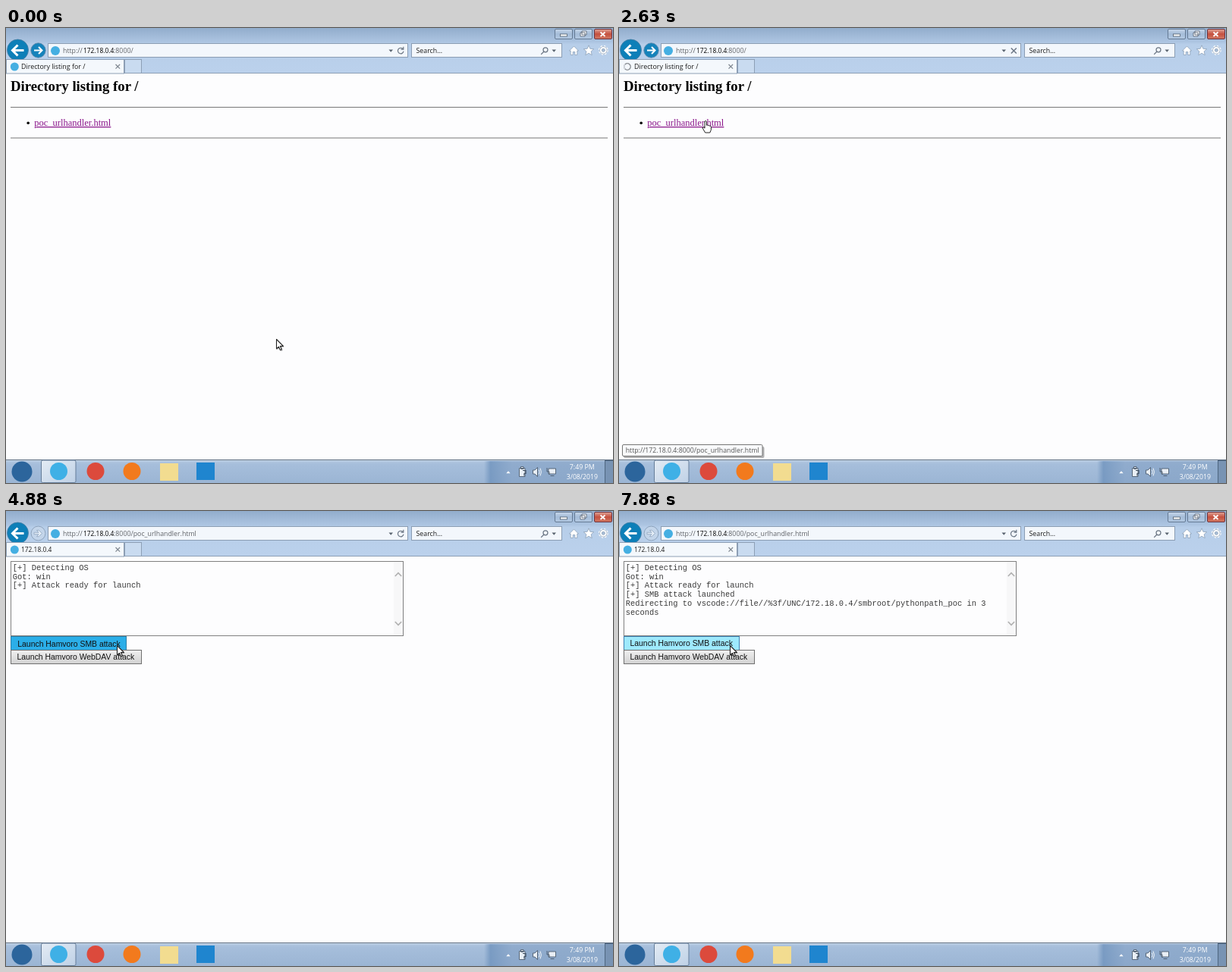
An HTML page that plays this animation: 800x600 px, repeating every 8 s.

```html
<!DOCTYPE html>
<html lang="en">
<head>
<meta charset="utf-8">
<title>Directory listing</title>
<style>
html, body { margin: 0; width: 100%; height: 100%; overflow: hidden; }
svg { display: block; width: 800px; height: 600px; }
text { white-space: pre; }
.ui { font: 8.8px "Open Sans", "Noto Sans", sans-serif; fill: #1c1c1c; }
.soft { fill: #606368; }
.serif { font: 12.5px "Liberation Serif", serif; }
.head { font-size: 18.75px; font-weight: bold; }
.link { fill: #8a168a; text-decoration: underline; }
.mono { font: 10.417px "Liberation Mono", monospace; fill: #3a3a3a; }
.btn { font: 10.417px "Liberation Sans", sans-serif; fill: #111; }
.line { fill: none; stroke: #6b7684; stroke-width: 1.2; }
.white { fill: none; stroke: #fff; }
</style>
</head>
<body>
<svg viewBox="0 0 800 600">
  <defs>
    <linearGradient id="frame" x2="0" y2="1">
      <stop stop-color="#92adcc"/><stop offset=".3" stop-color="#acc4e1"/><stop offset=".36" stop-color="#b7cee9"/><stop offset="1" stop-color="#bbd1ec"/>
    </linearGradient>
    <linearGradient id="bar" x2="0" y2="1">
      <stop stop-color="#b7cbe2"/><stop offset=".2" stop-color="#a6bedb"/><stop offset="1" stop-color="#9bb5d4"/>
    </linearGradient>
    <linearGradient id="tray">
      <stop stop-color="#6f93bd" stop-opacity="0"/><stop offset=".05" stop-color="#6f93bd" stop-opacity=".8"/><stop offset=".22" stop-color="#819fc4" stop-opacity=".6"/><stop offset="1" stop-color="#819fc2" stop-opacity=".6"/>
    </linearGradient>
    <linearGradient id="active" x2="1" y2="1">
      <stop stop-color="#e3ebf4"/><stop offset="1" stop-color="#bfd1e6"/>
    </linearGradient>
    <linearGradient id="ctrl" x2="0" y2="1">
      <stop stop-color="#c6d6e9"/><stop offset=".5" stop-color="#a4bcd8"/><stop offset="1" stop-color="#b4cae3"/>
    </linearGradient>
    <linearGradient id="close" x2="0" y2="1">
      <stop stop-color="#e0a598"/><stop offset=".5" stop-color="#c5503e"/><stop offset="1" stop-color="#d27a64"/>
    </linearGradient>
    <linearGradient id="face" x2="0" y2="1">
      <stop stop-color="#f0f0f0"/><stop offset="1" stop-color="#d2d2d2"/>
    </linearGradient>
  </defs>

  <rect width="800" height="600" fill="#fdfdfe"/>

  <!-- browser frame -->
  <rect width="800" height="60" fill="url(#frame)"/>
  <g fill="url(#ctrl)" stroke="#657a94">
    <rect x="723.5" y="1.5" width="23" height="13" rx="1.5"/>
    <rect x="749.5" y="1.5" width="23" height="13" rx="1.5"/>
    <rect x="775.5" y="1.5" width="23" height="13" rx="1.5" fill="url(#close)" stroke="#6e3440"/>
  </g>
  <g fill="#fff" stroke="#4f5c6c" stroke-width=".8">
    <rect x="730.5" y="8" width="9" height="3"/>
    <path d="M759 4h6v5h-6zM757 6h6v5h-6z"/>
  </g>
  <path d="M783.5 5.5l6 5.5m0-5.5l-6 5.5" class="white" stroke-width="1.7"/>

  <circle cx="15.5" cy="29" r="14" fill="#0d7fb8" stroke="#4a7ea3" stroke-width=".8"/>
  <path d="M23.5 29.5H9M15.5 22.5l-7 7 7 7" class="white" stroke-width="3"/>
  <g id="forwardOn">
    <circle cx="42.5" cy="29.5" r="9.7" fill="#1583bb" stroke="#5f86a8" stroke-width=".8"/>
    <path d="M37 29.5h10M43 25l4.5 4.5-4.5 4.5" class="white" stroke-width="2"/>
  </g>
  <g id="forwardOff" fill="none" stroke="#8ea4bd">
    <circle cx="42.5" cy="29.5" r="9.4" fill="#c3d5ea"/>
    <path d="M37 28.3h6l-2.5-3h2.7l4.3 4.2-4.3 4.2h-2.7l2.5-3h-6z" fill="#e4edf7" stroke-width=".8"/>
  </g>

  <g fill="#f3f7fc" stroke="#8b9db3">
    <rect x="55.5" y="20.5" width="474" height="18"/>
    <rect x="534.5" y="20.5" width="198" height="18"/>
  </g>
  <circle cx="65" cy="30" r="6" fill="#45afe2"/>
  <text x="75" y="33.3" class="ui soft">http://</text>
  <text x="102" y="33.3" class="ui" style="font-size:8.4px;fill:#000">172.18.0.4</text>
  <text x="142" y="33.3" class="ui soft" id="path"></text>
  <path d="M504.5 28.5h5.5l-2.75 3.3zM719.5 28.5h5.5l-2.75 3.3z" fill="#59636f"/>
  <g class="line">
    <path id="reload" d="M523 27.4a3.8 3.8 0 1 0 1 3.3M523.8 24.8v3.4h-3.4"/>
    <path id="stop" d="M516.8 26.5l7 7m0-7l-7 7" stroke-width="1.5"/>
    <circle cx="711" cy="28.8" r="3"/><path d="M709 31l-3.8 3.7"/>
  </g>
  <text x="540.5" y="33.3" class="ui">Search...</text>
  <g fill="#fff" stroke="#8398b1" stroke-width=".7">
    <path d="M742.5 30l6-6 6 6h-1.7v5.5h-3v-4h-2.6v4h-3V30z"/>
    <path d="M768 22.8l1.9 4.5 4.8.4-3.6 3.2 1.1 4.8-4.2-2.5-4.2 2.5 1.1-4.8-3.6-3.2 4.8-.4z"/>
    <circle cx="787.3" cy="29.3" r="5.3" stroke="#fff" stroke-width="2.2" stroke-dasharray="2.2 1.96"/>
    <circle cx="787.3" cy="29.3" r="4.8"/>
    <circle cx="787.3" cy="29.3" r="2" fill="#a9bfd9"/>
  </g>

  <path d="M0 59.5h800" stroke="#8d9fb5"/>
  <rect x="156.5" y="41.5" width="22" height="18" fill="#c9dbf0" stroke="#8d9fb5"/>
  <rect x=".5" y="41.5" width="155" height="18.5" fill="#f4f8fc" stroke="#8d9fb5"/>
  <circle id="tabIcon" cx="11.3" cy="51" r="5.5" fill="#45afe2"/>
  <g id="spinner" fill="none" stroke-width="1.5">
    <circle cx="11" cy="51" r="4.2" stroke="#8b8f94"/>
    <path d="M11 46.8a4.2 4.2 0 0 1 4.2 4.2" stroke="#d5dae0"/>
  </g>
  <text x="20" y="54.3" class="ui" id="tabText"></text>
  <path d="M144.5 48l5.6 5.6m0-5.6l-5.6 5.6" stroke="#7d858f" stroke-width="1.2"/>

  <!-- directory page -->
  <g id="listing" class="serif">
    <text x="6" y="83" class="head">Directory listing for /</text>
    <path d="M6 104.5h787M6 145h787" stroke="#777"/>
    <circle cx="29.2" cy="125.3" r="1.8"/>
    <text x="37.3" y="129" class="link">poc_urlhandler.html</text>
  </g>
  <g id="status">
    <rect x="6" y="552" width="185.5" height="15" rx="2" fill="#000" opacity=".3"/>
    <rect x="4.5" y="549.5" width="184.5" height="15" rx="1.5" fill="#f8f9fb" stroke="#767676"/>
    <text x="8.7" y="560.2" class="ui" style="font-size:8.75px;fill:#575757">http://172.18.0.4:8000/poc_urlhandler.html</text>
  </g>

  <!-- attack page -->
  <g id="attack">
    <rect id="box" x="6.5" y="66.5" width="517" height="98" fill="#fdfdfe"/>
    <rect x="511" y="67" width="12" height="97" fill="#f7f7f8"/>
    <path d="M512.8 86l4.2-4.3 4.2 4.3M512.8 146l4.2 4.3 4.2-4.3" fill="none" stroke="#b0b0b0" stroke-width="1.6"/>
    <g id="log" class="mono"></g>
    <rect id="smb" x="6.5" y="165.5" width="152" height="18"/>
    <text id="smbText" x="14.5" y="178" class="btn">Launch Hamvoro SMB attack</text>
    <rect x="6.5" y="183.5" width="172" height="18" fill="url(#face)" stroke="#707070"/>
    <text x="14.5" y="196.2" class="btn">Launch Hamvoro WebDAV attack</text>
  </g>

  <!-- taskbar -->
  <rect y="569" width="800" height="31" fill="url(#bar)"/>
  <rect x="630" y="570" width="170" height="30" fill="url(#tray)"/>
  <path d="M0 569.5h800" stroke="#5d6e82"/>
  <path d="M0 570.5h800" stroke="#c8d7e8"/>
  <circle cx="21" cy="585" r="13.5" fill="#2c659c"/>
  <rect x="46.5" y="570" width="45.5" height="29.5" rx="2" fill="url(#active)" stroke="#657d99"/>
  <circle cx="69.5" cy="584.5" r="11.5" fill="#3fb0e6"/>
  <circle cx="118" cy="584.5" r="11.5" fill="#dc4a3c"/>
  <circle cx="166" cy="584.5" r="11.5" fill="#f27a1d"/>
  <rect x="203" y="574" width="24" height="23" fill="#f2dc90"/>
  <rect x="251" y="573" width="24" height="23" fill="#1f85cf"/>
  <path d="M659.3 587.3l2.7-3 2.7 3z" fill="#fff"/>
  <g fill="#e9eff6" stroke="#3f4e60" stroke-width=".8">
    <path d="M676.5 580.5h7.5v11h-7.5zM678.5 578.5h3.5v3h-3.5z"/>
    <path d="M681 583.5h4v4h-2v3" fill="none" stroke-width="1.2"/>
    <path d="M694.5 583h2.5l3.5-3.5v12l-3.5-3.5h-2.5z"/>
    <path d="M702.3 582.5q2 3 0 6M704 580.5q3 5 0 10" fill="none" stroke="#f4f7fa" stroke-width="1"/>
    <path d="M715 581h9.5v7H715zM717.5 590.5h5"/>
    <path d="M713 580v5h3v4" fill="none"/>
  </g>
  <g class="ui" text-anchor="middle" style="fill:#fff">
    <text x="759.3" y="582">7:49 PM</text>
    <text x="759.3" y="595" style="font-size:8.7px">3/08/2019</text>
  </g>
  <rect x="789.5" y="570.5" width="11" height="30" fill="#7893b3" stroke="#4e6680"/>

  <g id="arrow" stroke-linejoin="round">
    <path d="M1.5 2v12.5l3-2.7 2 4.5 2.2-1-2-4.3h4z" fill="#000" opacity=".3"/>
    <path d="M.5.5V13l2.9-2.7 2 4.4 2-.9-2-4.3h4z" fill="#fff" stroke="#222" stroke-width="1.1"/>
  </g>
  <g id="hand" stroke-linejoin="round">
    <path id="palm" d="M-1 1.2q1.2-1.6 2.4 0v5q1.1-.8 2 .5 1.2-.7 2 .5 1.7-.4 2 1.2v3.8l-1.6 3.8H-.4l-3.4-6q-.4-1.6 1.2-1.3L-1 10.2z" fill="#fff" stroke="#222"/>
  </g>
</svg>
<script>
const LOOP = 8000, STEP = 125;
const HOVER = 2375, LOADING = 2500, LOADED = 3125, PRESS = 4750, RELEASE = 5000;
// time, x, y of the pointer tip
const route = [
  [0, 356, 410], [1625, 232, 288], [2375, 114, 122], [3375, 114, 122],
  [4000, 135, 162], [4500, 146, 177], [LOOP, 146, 177]
];
const lines = [
  "[+] Detecting OS", "Got: win", "[+] Attack ready for launch", "[+] SMB attack launched",
  "Redirecting to vscode://file//%3f/UNC/172.18.0.4/smbroot/pythonpath_poc in 3", "seconds"
];

const el = id => document.getElementById(id);
const show = (id, on) => el(id).style.display = on ? "" : "none";
const paint = (id, attrs) => {
  for (const name in attrs) el(id).setAttribute(name, attrs[name]);
};

el("log").innerHTML = lines.map((line, i) =>
  `<text x="8.8" y="${77.8 + i * 11.75}">${line}</text>`).join("");

function pointer(t) {
  const i = route.findIndex(p => p[0] > t);
  const [t0, x0, y0] = route[i - 1], [t1, x1, y1] = route[i];
  const k = (t - t0) / (t1 - t0);
  return [x0 + (x1 - x0) * k, y0 + (y1 - y0) * k];
}

function draw(t) {
  const [x, y] = pointer(t);
  const loaded = t >= LOADED, loading = t >= LOADING && !loaded;
  const onLink = t >= HOVER && !loaded;
  const onBox = loaded && y < 165, onButton = loaded && !onBox;
  const pressed = t >= PRESS && t < RELEASE;

  show("listing", !loaded);
  show("attack", loaded);
  show("forwardOn", !loaded);
  show("forwardOff", loaded);
  show("reload", !loading);
  show("stop", loading);
  show("tabIcon", !loading);
  show("spinner", loading);
  show("status", onLink);
  show("hand", onLink);
  show("arrow", !onLink);

  el("path").textContent = ":8000/" + (loaded ? "poc_urlhandler.html" : "");
  el("tabText").textContent = loaded ? "172.18.0.4" : "Directory listing for /";
  el("tabText").style.fontSize = loaded ? "8.4px" : "8.9px";
  paint("spinner", { transform: `rotate(${(t - LOADING) * .36 + 180} 11 51)` });

  paint("box", { stroke: onBox ? "#52aade" : "#808080" });
  paint("smb", {
    fill: pressed ? "#2baee8" : onButton ? "#9ee9fd" : "url(#face)",
    stroke: pressed ? "#2a7fa8" : onButton ? "#3c7fb1" : "#707070"
  });
  paint("smbText", { transform: pressed ? "translate(.8 .8)" : "" });
  [...el("log").children].forEach((row, i) => row.style.display = i < 3 || t >= RELEASE ? "" : "none");

  for (const id of ["arrow", "hand"]) paint(id, { transform: `translate(${x} ${y})` });
}

const start = performance.now();
function tick() {
  const t = (performance.now() - start) % LOOP;
  draw(Math.floor(t / STEP) * STEP);
  requestAnimationFrame(tick);
}
tick();
</script>
</body>
</html>
```
